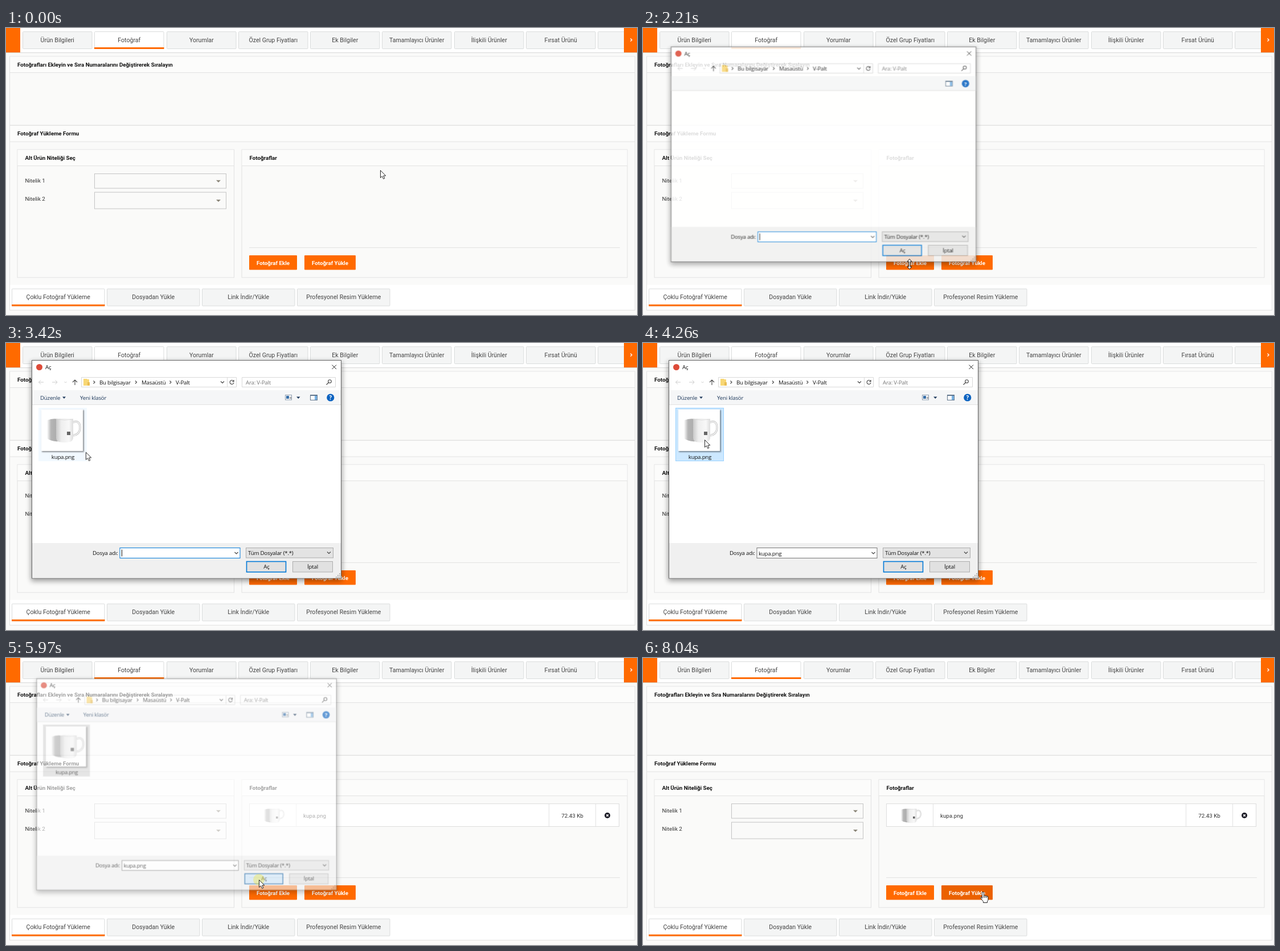
Write an HTML page that moves like this. It is 1108 by 505 pixels and loops after 8.75 s.

```html
<!DOCTYPE html>
<html lang="tr">
<head>
<meta charset="utf-8">
<title>Fotoğraf Yükleme</title>
<style>
html, body { margin: 0; width: 100%; height: 100%; overflow: hidden; background: #fafaf9; }
svg { display: block; width: 1108px; height: 505px; }
text { font: 9.75px Roboto, sans-serif; fill: #333; }
.tab { font-size: 10.6px; text-anchor: middle; fill: #444; }
.head { font-weight: 700; fill: #111; }
.btn { font-weight: 700; fill: #fff; text-anchor: middle; }
.win text { font: 9.75px "Open Sans", "Noto Sans", sans-serif; letter-spacing: -.25px; fill: #111; }
.win .bar { fill: #1e395b; }
.win .soft { fill: #777; }
.mid { text-anchor: middle; }
.line { fill: none; stroke: #e2e2e2; }
.chev { fill: none; stroke: #444; stroke-width: 1.1; }

/* One shared clock: 1% = 87.5 ms */
.a { animation: 8.75s linear infinite; }
.step { animation-timing-function: step-end; }

.cursor { animation-name: cursor; }
@keyframes cursor {
  0%, 5.03% { transform: translate(657px, 250px); animation-timing-function: cubic-bezier(.4, 0, .5, .95); }
  14.63% { transform: translate(470px, 406px); animation-timing-function: ease-out; }
  16.6%, 32.23% { transform: translate(468px, 416px); animation-timing-function: cubic-bezier(.4, 0, .4, 1); }
  41.71%, 51.31% { transform: translate(108px, 170px); animation-timing-function: cubic-bezier(.4, 0, .4, 1); }
  61.26% { transform: translate(443px, 376px); }
  63%, 74.97% { transform: translate(444px, 390px); animation-timing-function: ease-in; }
  76.8% { transform: translate(502px, 374px); }
  78.74% { transform: translate(569px, 392px); animation-timing-function: ease-out; }
  84.57% { transform: translate(595px, 406px); }
  91.89%, 100% { transform: translate(597px, 412px); }
}
.arrow { animation-name: arrow; }
@keyframes arrow {
  0% { opacity: 1; } 12.6% { opacity: 0; } 33% { opacity: 1; } 80.4%, 100% { opacity: 0; }
}
.hand { animation-name: hand; }
@keyframes hand {
  0% { opacity: 0; } 12.6% { opacity: 1; } 24.4% { opacity: 0; } 80.4%, 100% { opacity: 1; }
}
.resize { animation-name: resize; }
@keyframes resize {
  0% { opacity: 0; } 24.4% { opacity: 1; } 33%, 100% { opacity: 0; }
}
.click { animation-name: click; }
@keyframes click {
  0%, 16.4% { opacity: 0; } 17.2%, 18.4% { opacity: .75; } 20.6%, 42.2% { opacity: 0; }
  42.9%, 46.06% { opacity: .75; } 48.6%, 62.8% { opacity: 0; }
  64%, 67.09% { opacity: .75; } 69.14%, 100% { opacity: 0; }
}
.ripple { animation-name: ripple; transform-origin: 469px 415px; }
@keyframes ripple {
  0%, 16.4% { opacity: .25; transform: scale(0); }
  17.26% { opacity: .25; transform: scale(1); }
  19% { opacity: .2; transform: scale(3); }
  21%, 100% { opacity: 0; transform: scale(3); }
}
.add { animation-name: add; }
@keyframes add {
  0%, 12.6% { fill: #ff6a00; } 14%, 23.66% { fill: #eb6100; } 25%, 100% { fill: #ff6a00; }
}
.send { animation-name: send; }
@keyframes send {
  0%, 80.4% { fill: #ff6a00; } 82.5%, 100% { fill: #eb6100; }
}

.win { animation-name: win; transform-origin: 317px 222px; }
@keyframes win {
  0%, 23.66% { opacity: 0; transform: scale(.9); animation-timing-function: ease-out; }
  26%, 67.09% { opacity: 1; transform: none; animation-timing-function: ease-in; }
  69.14%, 100% { opacity: 0; transform: scale(.92); }
}
.file { animation-name: file; }
@keyframes file { 0% { opacity: 0; } 26.4%, 100% { opacity: 1; } }
.tools { animation-name: tools; }
@keyframes tools { 0% { opacity: 0; } 28.6%, 100% { opacity: 1; } }
.pick { animation-name: pick; }
@keyframes pick {
  0%, 38.4% { fill: #fff; stroke: #fff; }
  39.8%, 42.6% { fill: #e5f3ff; stroke: #e5f3ff; }
  43.6%, 63.8% { fill: #cce8ff; stroke: #99d1ff; }
  64.6%, 100% { fill: #d9d9d9; stroke: #d9d9d9; }
}
.name { animation-name: name; }
@keyframes name { 0% { opacity: 0; } 43.6%, 100% { opacity: 1; } }
.caret { animation-name: caret; }
@keyframes caret { 0% { opacity: 1; } 43.6%, 100% { opacity: 0; } }
.field { animation-name: field; }
@keyframes field {
  0%, 46.06% { stroke: #0078d7; } 47.6%, 100% { stroke: #777; }
}
.combo { animation-name: combo; }
@keyframes combo {
  0%, 57.6% { fill: #e3e3e3; stroke: #adadad; }
  59%, 61.83% { fill: #e5f1fb; stroke: #0078d7; }
  65.03% { fill: #dfe6eb; stroke: #8fa9bd; }
  68%, 100% { fill: #e3e3e3; stroke: #adadad; }
}
.open { animation-name: open; }
@keyframes open {
  0%, 62% { fill: #e1e1e1; stroke: #0078d7; }
  63.2% { fill: #e5f1fb; stroke: #0078d7; }
  64.2%, 100% { fill: #cce4f7; stroke: #1a64a5; }
}
.row { animation-name: row; }
@keyframes row { 0% { opacity: 0; } 68%, 100% { opacity: 1; } }
</style>
</head>
<body>
<svg viewBox="0 0 1108 505">
  <defs>
    <linearGradient id="shade"><stop offset="0" stop-color="#fff"/><stop offset=".35" stop-color="#b5b5b5"/><stop offset="1" stop-color="#aaa"/></linearGradient>
    <linearGradient id="cup"><stop offset="0" stop-color="#c9c9c9"/><stop offset=".3" stop-color="#eee"/><stop offset=".75" stop-color="#f8f8f8"/><stop offset="1" stop-color="#ddd"/></linearGradient>
    <filter id="glow" x="-10%" y="-10%" width="120%" height="120%"><feGaussianBlur stdDeviation="5"/></filter>
    <filter id="blur" x="-10%" y="-10%" width="120%" height="120%"><feGaussianBlur stdDeviation="1"/></filter>
    <clipPath id="addClip"><rect x="427" y="400" width="84" height="25.5" rx="1"/></clipPath>
    <g id="mug">
      <path d="M0 4Q10 0 20 2V41Q9 42 0 36Z" fill="url(#shade)"/>
      <path d="M44 8C55 3 58 10 58 17C58 26 51 32 43 30" fill="none" stroke="#c4c4c4" stroke-width="3.4"/>
      <path d="M44 8C55 3 58 10 58 17C58 26 51 32 43 30" fill="none" stroke="#f2f2f2" stroke-width="1.8"/>
      <path d="M16 2Q31-1 46 2V35Q45 41 40 42Q31 44 21 42Q16 40 16 35Z" fill="url(#cup)"/>
      <path d="M16 2Q31 5 46 2" fill="none" stroke="#d5d5d5" stroke-width=".8"/>
      <rect x="35" y="24" width="6" height="6" fill="#666"/>
    </g>
  </defs>

  <g id="page"></g>

  <rect class="a add" x="427" y="400" width="84" height="25.5" rx="1"/>
  <g clip-path="url(#addClip)"><circle class="a ripple" cx="469" cy="415" r="23" fill="#fff"/></g>
  <text class="btn" x="469" y="416.5">Fotoğraf Ekle</text>
  <rect class="a send" x="524" y="400" width="90" height="25.5" rx="1"/>
  <text class="btn" x="569" y="416.5">Fotoğraf Yükle</text>

  <g class="a step row">
    <rect x="427.5" y="256.5" width="649" height="40" fill="#fff" stroke="#ddd"/>
    <path class="line" d="M509.5 257v39M953.5 257v39M1035.5 257v39"/>
    <use href="#mug" transform="translate(453 264.5) scale(.6)"/>
    <text x="522" y="280.5">kupa.png</text>
    <text class="mid" x="994.5" y="280.5">72.43 Kb</text>
    <circle cx="1056" cy="277" r="5" fill="#1d1d27"/>
    <path d="M1054.2 275.2l3.6 3.6m0-3.6l-3.6 3.6" stroke="#fff" stroke-width="1.5"/>
  </g>

  <g class="a win">
    <rect x="44" y="33" width="546" height="386" opacity=".38" filter="url(#glow)"/>
    <rect x="45.5" y="30.5" width="543" height="383.5" fill="#fff" stroke="#666"/>
    <rect x="46" y="83" width="542" height="26" fill="#f5f6f7"/>
    <path class="line" d="M46 108.5h542"/>
    <rect x="46" y="352" width="542" height="61.5" fill="#f0f0f0"/>
    <circle cx="58.5" cy="42.5" r="5.5" fill="#dd4b39"/>
    <text x="69" y="46">Aç</text>
    <path d="M572.5 38.5l7.5 7.5m0-7.5l-7.5 7.5" stroke="#222"/>
    <path d="M66 69H57.5m3.5-3.5L57.5 69l3.5 3.5M81 69h9m-3.5-3.5L90 69l-3.5 3.5M102.500 68l2 2 2-2" fill="none" stroke="#ccc"/>
    <path class="chev" d="M121 74v-9m-4 4l4-4 4 4"/>
    <path class="line" style="stroke:#d9d9d9" d="M132.5 60.500h272v17h-272zM388.500 61v16M414.500 60.500h164v17h-164z"/>
    <path d="M136 63h6l1 1h3v11h-10z" fill="#f8d775"/><path d="M143 69h4v6h-4z" fill="#e9bd55"/>
    <path class="chev" d="M153.500 66.500l2.500 2.500-2.500 2.500M227 66.500l2.500 2.500-2.500 2.500M287.500 66.500l2.500 2.500-2.500 2.500M377 67.500l3 3 3-3"/>
    <path class="chev" d="M399.500 67a3.500 3.500 0 1 0 .5 3M400 65v3h-3"/>
    <text x="164" y="72.500">Bu bilgisayar</text>
    <text x="238" y="72.500">Masaüstü</text>
    <text x="298" y="72.500">V-Palt</text>
    <text class="soft" x="421" y="72.500">Ara: V-Palt</text>
    <circle class="chev" cx="568.500" cy="67.500" r="2.800"/><path class="chev" d="M566.500 69.500l-4 4"/>

    <g class="a step tools">
      <text class="bar" x="60" y="99.500">Düzenle</text>
      <text class="bar" x="130" y="99.500">Yeni klasör</text>
      <path d="M99 94.500h6l-3 3.500zM510 94.500h6.500l-3.200 3.500z" fill="#1e395b"/>
      <rect x="490.500" y="91.500" width="11" height="8.500" fill="#fff" stroke="#8c9bad"/>
      <path d="M492 93h5v5h-5z" fill="#386fa8"/><path d="M498 95.500h3m-3 2h3" stroke="#777"/>
    </g>
    <rect x="534.500" y="91.500" width="12" height="9" fill="#fff" stroke="#60758c"/>
    <path d="M542 92h4v8h-4z" fill="#79b2e2"/><path d="M535 92.500h11" stroke="#60758c"/>
    <circle cx="569.800" cy="96" r="6.600" fill="#0a62c0"/>
    <text class="mid" x="569.800" y="99.800" style="fill:#fff;font-weight:700">?</text>

    <g class="a step file">
      <rect class="a pick" x="57.500" y="114.500" width="84" height="93"/>
      <rect x="63" y="118" width="74" height="74" opacity=".4" filter="url(#blur)"/>
      <rect x="62" y="117" width="73" height="73" fill="#fff"/>
      <use href="#mug" x="72" y="132"/>
      <text class="mid" x="100" y="203.500">kupa.png</text>
    </g>

    <text x="152" y="372.500">Dosya adı:</text>
    <rect class="a field" x="200" y="360.500" width="211" height="18" fill="#fff"/>
    <path class="chev" d="M401.500 368l3 3 3-3"/>
    <text class="a step name" x="203" y="373.500">kupa.png</text>
    <path class="a step caret" d="M203.500 363.500v12" stroke="#111"/>
    <rect class="a combo" x="421.500" y="360.500" width="153" height="17.500"/>
    <text x="425" y="372.500">Tüm Dosyalar (*.*)</text>
    <path class="chev" d="M564 367.500l3 3 3-3"/>
    <rect class="a open" x="422.500" y="384.500" width="69" height="18.500" stroke-width="1.600"/>
    <text class="mid" x="457.500" y="397">Aç</text>
    <rect x="503.500" y="384.500" width="70" height="18.500" fill="#e1e1e1" stroke="#adadad"/>
    <text class="mid" x="538.500" y="397">İptal</text>
    <path d="M585 406h2M582 409h2m1 0h2M579 412h2m1 0h2m1 0h2" stroke="#b5b5b5" stroke-width="2"/>
  </g>

  <g class="a cursor">
    <circle class="a click" r="10" fill="#f6e71d"/>
    <path class="a step arrow" d="M.5.500V13.500L3.500 10.800L5.700 15.500L7.900 14.500L5.800 10H9.800Z" fill="#fff" stroke="#111" stroke-width=".9"/>
    <g class="a step hand" stroke="#111" stroke-width=".9" stroke-linejoin="round">
      <path d="M-1.500 11V1Q-1.500-.5 0-.5T1.500 1V6Q3 5 4 6.500Q5.500 5.500 6.500 7Q9 6.500 9 9V13Q9 15 7.500 16V18.500H.5V16.500L-4 10.500Q-5 8.800-3.500 8.500T-1.500 11Z" fill="#fff"/>
      <path d="M1.500 6V10M4 6.500V10M6.500 7V10" fill="none"/>
    </g>
    <path class="a step resize" d="M0-9.500L4-5H1.200V4H4L0 8.500L-4 4H-1.200V-5H-4Z" fill="#fff" stroke="#111" stroke-width="1"/>
  </g>
</svg>
<script>
const ORANGE = '#ff6a00';
const rect = (x, y, w, h, fill, stroke = 'none') =>
  `<rect x="${x}" y="${y}" width="${w}" height="${h}" fill="${fill}" stroke="${stroke}"/>`;
const label = (x, y, str, cls = '') => `<text class="${cls}" x="${x}" y="${y}">${str}</text>`;

function tab(x, y, w, str, active) {
  return `<rect x="${x}" y="${y}" width="${w}" height="30" rx="1" fill="${active ? '#fff' : '#f4f5f5'}" stroke="#dadcdc"/>`
    + (active ? rect(x - .5, y + 27.5, w + 1, 3, ORANGE) : '')
    + label(x + w / 2, y + 18, str, 'tab');
}

// Bordered box with a titled header strip
function panel(x, y, w, h, title) {
  return rect(x, y, w, h, '#fafaf9', '#e2e2e2')
    + rect(x + .5, y + .5, w - 1, 28, '#fcfcfb')
    + `<path class="line" d="M${x} ${y + 28.5}h${w}"/>`
    + label(x + 13.5, y + 17.5, title, 'head');
}

function select(y, h, str) {
  return rect(155.5, y, 231, h, '#fafaf9', '#c4c4c4')
    + `<path d="M369 ${y + h / 2 - 1.5}h8l-4 4z" fill="#8b8679"/>`
    + label(33.5, y + 15.3, str);
}

const tabs = ['Ürün Bilgileri', 'Fotoğraf', 'Yorumlar', 'Özel Grup Fiyatları', 'Ek Bilgiler',
  'Tamamlayıcı Ürünler', 'İlişkili Ürünler', 'Fırsat Ürünü', ''];
const modes = ['Çoklu Fotoğraf Yükleme', 'Dosyadan Yükle', 'Link İndir/Yükle', 'Profesyonel Resim Yükleme'];

document.getElementById('page').innerHTML = [
  rect(0, 0, 1108, 505, '#fafaf9'),
  rect(0, 0, 1108, 43, '#fff'),
  '<path class="line" style="stroke:#d8d8d8" d="M0 43.5h1108"/>',
  ...tabs.map((t, i) => tab(Math.round(29 + 126.25 * i) + .5, 6.5, 121.5, t, i === 1)),
  rect(0, 0, 25, 43, ORANGE),
  rect(1085, 0, 23, 43, ORANGE),
  '<path d="M1096.500 18.500l2.500 2.500-2.500 2.500" fill="none" stroke="#fff" stroke-width="1.400"/>',
  panel(6.5, 50, 1098, 121, 'Fotoğrafları Ekleyin ve Sıra Numaralarını Değiştirerek Sıralayın'),
  panel(6.5, 171.5, 1098, 325, 'Fotoğraf Yükleme Formu'),
  rect(7, 452, 1097, 44, '#fff'),
  panel(20, 214, 380.5, 225, 'Alt Ürün Niteliği Seç'),
  panel(414, 214, 677, 225, 'Fotoğraflar'),
  select(256.5, 25.5, 'Nitelik 1'),
  select(289, 29, 'Nitelik 2'),
  '<path class="line" d="M427 386.500h651"/>',
  ...modes.map((t, i) => tab(10.5 + 167 * i, 459, 162.5, t, i === 0)),
].join('');
</script>
</body>
</html>
```
